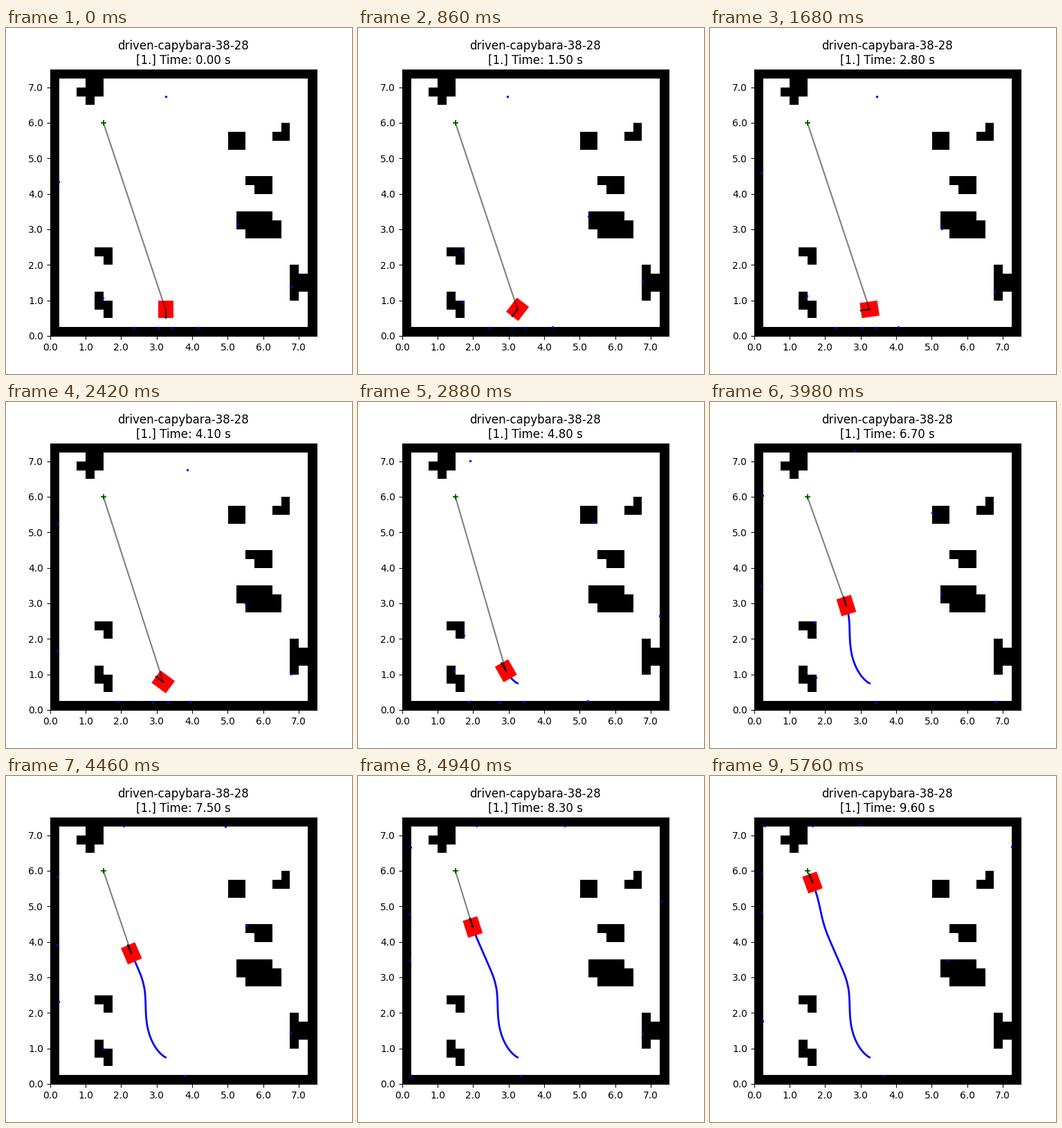
Recreate the animation shown at these times as a matplotlib script. Size 500x500 px, loop 5.86 s.

```python
import numpy as np
import matplotlib.pyplot as plt
from matplotlib.animation import FuncAnimation
from matplotlib.patches import Polygon
from matplotlib.ticker import FormatStrFormatter, MultipleLocator

CELL, N = 0.25, 30
SIZE = CELL * N
START, GOAL = np.array([3.25, 0.75]), np.array([1.5, 6.0])
LENGTH, WIDTH = 0.5, 0.43
LAST = 96
RAYS, RAY_STEP, RAY_MAX = 9, 0.05, 6.0

# Obstacle pieces: (width, height) in cells -> lower left cells
PIECES = {
    (2, 2): [(4, 27), (20, 21), (23, 16)],
    (4, 2): [(21, 12), (22, 11)],
    (2, 1): [(3, 27), (25, 22), (22, 17), (5, 9)],
    (1, 2): [(4, 26), (26, 22), (27, 4), (27, 6), (28, 5),
             (6, 8), (5, 3), (6, 2)],
}


def build_grid():
    grid = np.ones((N, N))
    grid[1:-1, 1:-1] = 0
    for (w, h), cells in PIECES.items():
        for c, r in cells:
            grid[r:r + h, c:c + w] = 1
    return grid


def ramp(t, start, end):
    return np.clip((t - start) / (end - start), 0, 1)


def ease(t, start, end):
    u = ramp(t, start, end)
    return u * u * (3 - 2 * u)


def unit(theta):
    return np.stack([np.cos(theta), np.sin(theta)], axis=-1)


def integrate(rate, dt):
    """Running trapezoid sum along the first axis."""
    steps = (rate[1:] + rate[:-1]) / 2 * dt
    return np.concatenate([np.zeros_like(rate[:1]), np.cumsum(steps, axis=0)])


def drive():
    """Spin towards the goal, drive off, then weave; one pose per 0.1 s."""
    sub = 20
    dt = 0.1 / sub
    t = np.arange(LAST * sub + 1) * dt
    spin = 34.26 * np.minimum(ramp(t, 0, 0.82), 1 - ramp(t, 5.24, 6))
    weave = (22 * ease(t, 6, 7.08) - 11.5 * ease(t, 7.8, 8.8)
             + 8.2 * ease(t, 8.8, 9.6))
    theta = np.radians(270 - integrate(spin, dt) + weave)
    speed = ramp(t, 3.63, 5.03)
    pos = START + integrate(speed[:, None] * unit(theta), dt)
    return pos[::sub], theta[::sub]


def scan(grid, pos, theta):
    """March the rays until they hit a wall or reach full range."""
    rays = unit(theta + np.pi + 2 * np.pi / RAYS * np.arange(RAYS))
    dist = np.arange(1, round(RAY_MAX / RAY_STEP) + 1) * RAY_STEP
    pts = pos + dist[None, :, None] * rays[:, None, :]
    col, row = np.clip((pts / CELL).astype(int), 0, N - 1).transpose(2, 0, 1)
    hit = grid[row, col] > 0
    hit[:, -1] = True
    return pts[np.arange(RAYS), hit.argmax(axis=1)]


def body(pos, theta):
    ahead = unit(theta) * LENGTH / 2
    side = unit(theta + np.pi / 2) * WIDTH / 2
    return [pos + ahead + side, pos + ahead - side,
            pos - ahead - side, pos - ahead + side]


grid = build_grid()
track, heading = drive()
scans = [scan(grid, p, th) for p, th in zip(track, heading)]

fig, ax = plt.subplots(figsize=(5, 5), dpi=100)
ax.imshow(grid, cmap="binary", origin="lower", interpolation="nearest",
          extent=(0, SIZE, 0, SIZE))
for axis in (ax.xaxis, ax.yaxis):
    axis.set_major_locator(MultipleLocator(1))
    axis.set_major_formatter(FormatStrFormatter("%.1f"))
ax.set(xlim=(0, SIZE), ylim=(0, SIZE))

title = ax.set_title("")
trail, = ax.plot([], [], color="blue", lw=2, zorder=0.5)
robot = ax.add_patch(Polygon(np.zeros((4, 2)), fc="red", lw=0))
ax.plot(*GOAL, "+", color="green", ms=6, mew=1.5)
aim, = ax.plot([], [], color="black", alpha=0.5, lw=1.5)
nose, = ax.plot([], [], color="black", lw=1.5)
dots, = ax.plot([], [], "o", color="blue", ms=2.5, mew=0)


def update(tick):
    # Steps last 20 ms and 100 ms in turn
    k = min(2 * (tick // 6) + (tick % 6 > 0), LAST)
    pos, th = track[k], heading[k]
    title.set_text(f"driven-capybara-38-28\n[1.] Time: {k / 10:.2f} s")
    trail.set_data(*track[:k + 1].T)
    robot.set_xy(body(pos, th))
    aim.set_data(*zip(pos, GOAL))
    nose.set_data(*zip(pos, pos + unit(th) * LENGTH / 2))
    dots.set_data(*scans[k].T)
    return title, trail, robot, aim, nose, dots


anim = FuncAnimation(fig, update, frames=293, interval=20,
                     repeat=True, repeat_delay=0)
plt.show()
```
